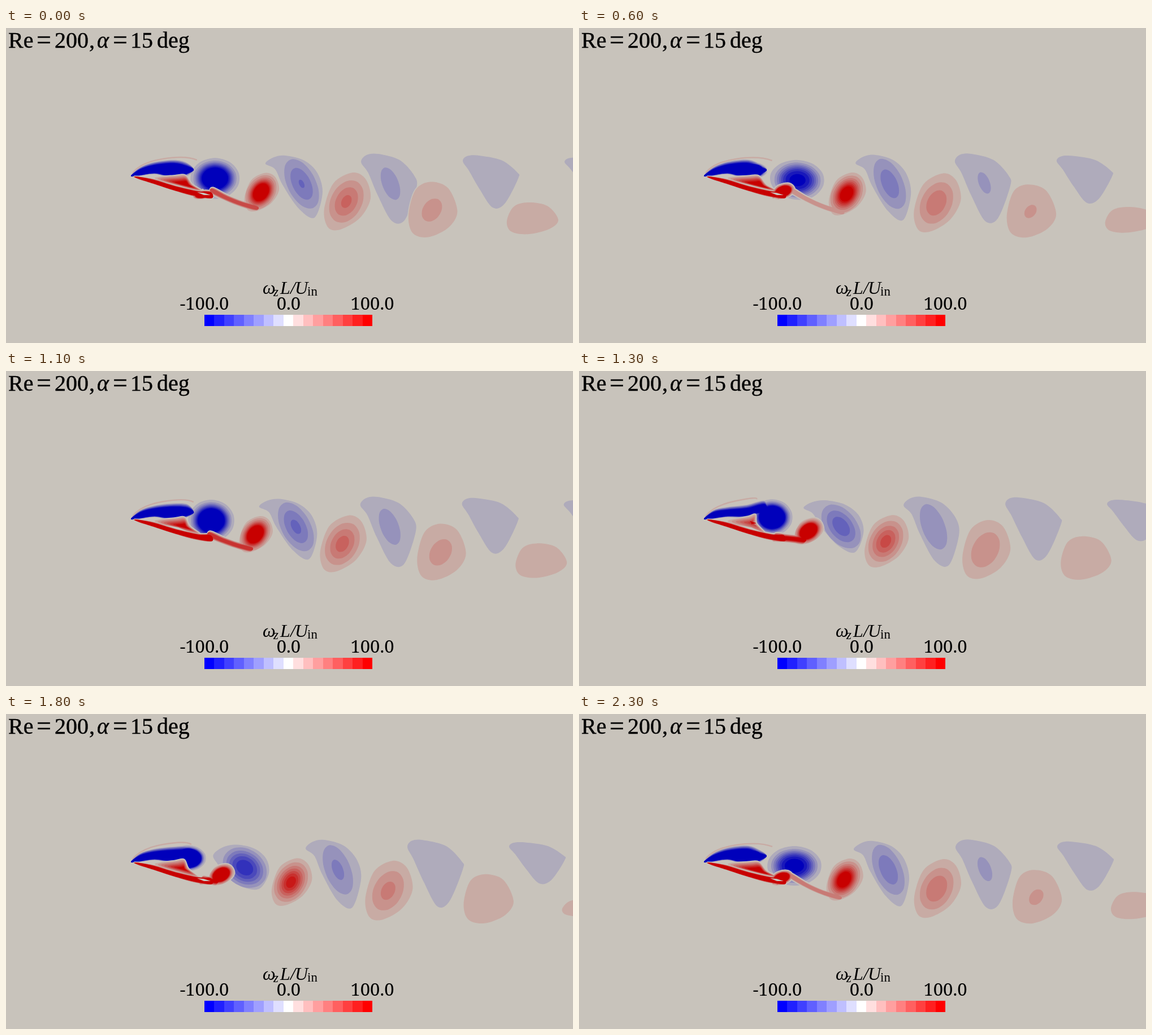
Write an HTML page that moves like this. It is 1003x558 px and loops after 2400 ms.

```html
<!DOCTYPE html>
<html lang="en">
<head>
<meta charset="utf-8">
<title>Vortex shedding</title>
<style>
  html, body { margin: 0; width: 100%; height: 100%; overflow: hidden; background: #c8c3bb; }
  svg { display: block; width: 100%; height: 100%; }
  .title { font: 40px "Liberation Serif", serif; stroke: #000; stroke-width: .4px; }
  .eq { font-size: 46px; }
  .label { font: 32px "Liberation Serif", serif; }
  .tick { font: 31px "Noto Serif", serif; text-anchor: middle; }
  .it { font-style: italic; }
  .sub { font-size: 23px; }
</style>
</head>
<body>
<svg viewBox="0 0 1003 558">
  <rect width="1003" height="558" fill="#c8c3bb"/>
  <path id="arc" fill="none" stroke="#c8aba4" stroke-width="2.4"/>
  <g id="wake"></g>
  <path id="slit" fill="#c8c3bb"/>
  <text class="title" y="35"><tspan x="4">Re</tspan><tspan class="eq" x="54" y="36">=</tspan><tspan x="86" y="35">200</tspan><tspan x="147">,</tspan><tspan x="161" class="it">α</tspan><tspan class="eq" x="189" y="36">=</tspan><tspan x="220" y="35">15</tspan><tspan x="267">deg</tspan></text>
  <text class="label it" y="471"><tspan x="454">ω</tspan><tspan class="sub" x="473" y="475">z</tspan><tspan x="485" y="471">L</tspan><tspan x="503">/</tspan><tspan x="511">U</tspan><tspan class="sub" x="533" y="474" font-style="normal">in</tspan></text>
  <text class="tick" y="499"><tspan x="351">-100.0</tspan><tspan x="500">0.0</tspan><tspan x="648">100.0</tspan></text>
  <g id="bar" shape-rendering="crispEdges"></g>
</svg>
<script>
const NS = 'http://www.w3.org/2000/svg';
const $ = id => document.getElementById(id);
const LEVELS = 8, FRAMES = 24, STEP = 100, BG = '#c8c3bb';

const clamp = x => Math.min(1, Math.max(0, x));
const ramp = (a, b, x) => clamp((x - a) / (b - a));
const mix = (a, b, f) => Array.isArray(a) ? a.map((x, i) => mix(x, b[i], f)) : a + (b - a) * f;

function make(parent, tag, attrs) {
  const el = document.createElementNS(NS, tag);
  for (const k in attrs) el.setAttribute(k, attrs[k]);
  return parent.appendChild(el);
}

// Colour bar: 17 cells from blue through white to red
for (let i = -8; i <= 8; i++) {
  const v = Math.round(255 * (1 - Math.abs(i) / 8));
  make($('bar'), 'rect', {
    x: 350.5 + (i + 8) * 17.5, y: 508, width: 17.6, height: 20,
    fill: i < 0 ? `rgb(${v},${v},255)` : `rgb(255,${v},${v})`
  });
}

// One path per colour level, so overlapping shapes show the stronger level
function levelPaths(isRed) {
  return Array.from({ length: LEVELS }, (_, i) => {
    const f = 1 - (i + 1) / LEVELS;
    const fill = isRed ? `rgb(200,${195 * f},${187 * f})` : `rgb(${200 * f},${195 * f},187)`;
    const edge = isRed && i === 0 ? { stroke: BG, 'stroke-width': 3, 'paint-order': 'stroke' } : {};
    return make($('wake'), 'path', { fill, ...edge });
  });
}
const paths = { blue: levelPaths(false), red: levelPaths(true) };
let ink;

// Closed smooth curve through [x, y] points
function loop(pts) {
  const n = pts.length, T = .16;
  const at = i => pts[(i + n) % n];
  let d = 'M' + pts[0].map(x => x.toFixed(1)).join(' ');
  for (let i = 0; i < n; i++) {
    const [a, b, c, e] = [at(i - 1), at(i), at(i + 1), at(i + 2)];
    const q = [...b.map((x, k) => x + (c[k] - a[k]) * T), ...c.map((x, k) => x - (e[k] - b[k]) * T), ...c];
    d += 'C' + q.map(x => x.toFixed(1)).join(' ');
  }
  return d + 'Z';
}

// Ellipse leaning by skew, clockwise from the upper left
function oval({ cx, cy, rx, ry, skew }, r = 1) {
  return Array.from({ length: 10 }, (_, i) => {
    const t = i * Math.PI / 5 - 2.8;
    return [cx + rx * r * Math.cos(t), cy + ry * r * Math.sin(t + skew)];
  });
}

// Outlines inside a unit box, young and old
const BLUE_YOUNG = [[0, .13], [.14, .03], [.35, 0], [.68, .08], [.91, .28], [1, .6], [.86, 1], [.58, .85], [.3, .47], [.17, .22]];
const BLUE_OLD = [[0, .11], [.08, .01], [.29, 0], [.7, .09], [.98, .32], [1, .44], [.76, .92], [.54, 1], [.3, .64], [.11, .29]];
const RED_YOUNG = [[.62, 0], [.9, .12], [1, .46], [.77, .8], [.36, 1], [.09, .97], [0, .66], [.2, .19]];
const RED_OLD = [[.41, 0], [.79, .11], [1, .55], [.82, .84], [.41, 1], [.09, .92], [0, .6], [.13, .14]];

const fit = (unit, x, y, w, h) => unit.map(([u, v]) => [x + u * w, y + v * h]);

// Blue roll-up above the plate: age, centre, radii, peak level
const ROLL_UP = [
  [.156, 301, 252, 29, 14, 60],
  [.699, 346, 260, 37, 34, 12],
  [.944, 363, 265, 41, 37, 13],
  [1.156, 381, 269, 48, 35, 8.2]
];

function rollUp(age) {
  let i = 1;
  while (i < ROLL_UP.length - 1 && ROLL_UP[i][0] < age) i++;
  const f = ramp(ROLL_UP[i - 1][0], ROLL_UP[i][0], age);
  const [, cx, cy, rx, ry, peak] = mix(ROLL_UP[i - 1], ROLL_UP[i], f);
  const v = { cx, cy, rx, ry, skew: 0, peak, power: .3 };
  return { ...v, outline: oval(v) };
}

// Age counts shedding periods; lag holds the first wake slightly upstream
function blueVortex(age, lag) {
  if (age < 1.7) {
    const a = rollUp(age), b = blueVortex(1.7, lag), f = ramp(1.156, 1.7, age);
    return Object.fromEntries(Object.keys(a).map(k => [k, mix(a[k], b[k], f)]));
  }
  const young = Math.max(0, 2.156 - age);
  const x = 486 + 180 * (age - 2.156) - 14 * lag, w = 98 + 22 * young;
  const y = 223 + 8 * Math.max(0, 2.4 - age) + 4 * Math.max(0, age - 3.3);
  const h = Math.max(300, 348 - 20 * (age - 2.8) ** 2) - y;
  return {
    cx: x + 62 + 15 * young - 10 * ramp(2.1, 2.7, age), cy: 276 - 8 * ramp(3, 4, age),
    rx: .46 * w, ry: .6 * h, skew: .5, power: .5,
    peak: Math.min(3.8, 3.9 * Math.exp(-.68 * (age - 1.9))),
    outline: fit(mix(BLUE_YOUNG, BLUE_OLD, ramp(2.156, 3.4, age)), x, y, w, h)
  };
}

function redVortex(age, lag) {
  const young = Math.max(0, 1.7 - age);
  const x = 593 + 174 * (age - 2.156) + 20 * young + 27 * young ** 2 - 32 * lag;
  const w = Math.min(34 + 26.5 * age, 73 + 4.5 * age);
  const y = 255 + 22 * Math.exp(-3 * (age - .156)) + 10 * Math.max(0, age - 1.7) ** 2;
  const h = Math.max(303, 371 - 9.5 * (age - 3.25) ** 2) - y;
  return {
    cx: x + .48 * w, cy: y + .51 * h, rx: .55 * w, ry: .55 * h, skew: -.3, power: .5,
    peak: Math.exp(Math.max(2.4 - 1.6 * (age - 1.156), 1.24 - .75 * (age - 2.156))),
    outline: fit(mix(RED_YOUNG, RED_OLD, ramp(2.2, 3.2, age)), x, y, w, h)
  };
}

// Outline, then the inner contours of a Gaussian vortex
function drawVortex(colour, v) {
  ink[colour][0] += loop(v.outline);
  for (let i = 2; i <= LEVELS && v.peak > i - .5; i++) {
    const r = (Math.log(v.peak / (i - .5)) / Math.log(v.peak * 2)) ** v.power;
    ink[colour][i - 1] += loop(oval(v, r));
  }
}

// Core polygon with a halo that widens by dy at each point
function drawSheet(colour, pts, dy) {
  for (let i = 1; i <= LEVELS; i++)
    ink[colour][i - 1] += loop(pts.map(([x, y], k) => [x, y + dy[k] * (1 - i / LEVELS)]));
}

// Band that feeds a young red vortex from the trailing edge
function drawTail(age, v) {
  const s = ramp(.7, 1.156, age);
  const from = [345 + 27 * s, 294 - 9 * s], [ex, ey] = v.outline[4];
  const count = Math.round(8 * clamp((1.3 - age) / .45));
  const half = 7 - 3 * s;
  const line = [0, .33, .66, 1].map(f => {
    const [x, y] = mix(from, [ex, ey - half], f);
    return [x, y + 20 * s * f * (1 - f)];
  });
  for (let i = 0; i < count; i++) {
    const w = half * (1 - i / (count + 4));
    const top = line.map(([x, y]) => [x + w * .4, y - w]);
    const bottom = line.map(([x, y]) => [x - w * .4, y + w]).reverse();
    ink.red[i] += loop([...top, ...bottom]);
  }
}

const PLATE = [[228, 263], [260, 269], [300, 281], [340, 290], [362, 291], [364, 301], [335, 297], [300, 288], [260, 275], [235, 267]];
const PLATE_HALO = [0, -2, -2, -2, -2, 1, 2, 1, 1, 1];
const LAYER_HALO = [0, -4, -6, -7, -7, 0, 4, 3, 2, 1];

// Everything attached to the plate sways once per period
function drawPlate(s) {
  drawSheet('blue', [
    [221, 262], [238, 250], [263, 244 - 2 * s], [297, 241 - 2 * s], [323 - 5 * s, 241 + 5 * s],
    [332, 251 + s], [312, 257 + 5 * s], [290, 260 + 3 * s], [263, 257], [235, 261]
  ], LAYER_HALO);
  const tip = [314 + 8 * s, 274 + 5 * s];
  const spur = [
    [263, 266], [299, 260 + 2 * s], [315 + 3 * s, 258 + 4 * s],
    [323 + 9 * s, 274 + 4 * s], [340 + 10 * s, 289], [304 + 4 * s, 280]
  ];
  for (let i = 0; i < LEVELS; i++)
    ink.red[i] += loop(mix(spur, spur.map(() => tip), i / (9 + 3 * s)));
  drawSheet('red', PLATE, PLATE_HALO);
  $('arc').setAttribute('d', `M224 257Q238 238 278 ${231 + s}T${328 + 14 * s} ${231 + 4 * s}`);
}

function draw(n) {
  const total = .083 + .351 * n - .06 * Math.max(0, 1 - n / 4);
  const whole = Math.floor(total), phase = total - whole;
  ink = { blue: Array(LEVELS).fill(''), red: Array(LEVELS).fill('') };

  drawPlate(Math.cos(2 * Math.PI * (phase - .15)));
  for (let age = phase; age < 6; age++) {
    const lag = Math.max(0, 1 - n / 12) * ramp(1.8, 2.8, age);
    const red = redVortex(age, lag);
    drawVortex('blue', blueVortex(age, lag));
    drawVortex('red', red);
    drawTail(age, red);
  }
  for (const c in paths) paths[c].forEach((el, i) => el.setAttribute('d', ink[c][i]));
  $('slit').setAttribute('d', phase > .5
    ? 'M284 273L305 277L323 285L302 280Z'
    : 'M338 291L350 292L362 296L350 296Z');
}

let shown = -1;
const start = performance.now();
function tick() {
  const n = Math.floor((performance.now() - start) / STEP) % FRAMES;
  if (n !== shown) draw(shown = n);
  requestAnimationFrame(tick);
}
tick();
</script>
</body>
</html>
```
